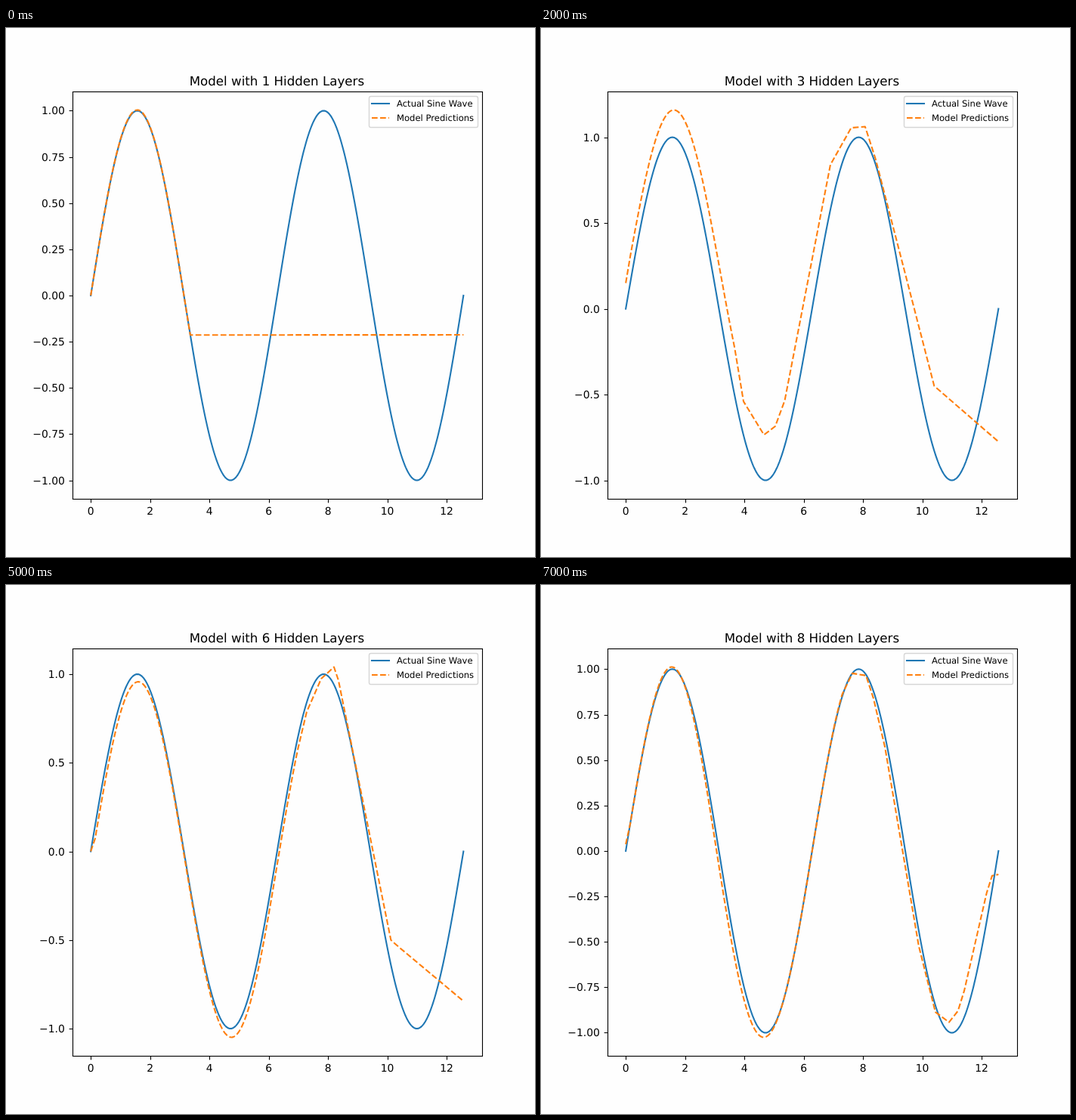
These frames come from a looping animation (700x700 px, 8 s). An HTML page:

```html
<!DOCTYPE html>
<html lang="en">
<head>
<meta charset="utf-8">
<title>Hidden layers</title>
<style>
  html, body { margin: 0; width: 100%; height: 100%; overflow: hidden; background: #fefefe; }
  svg { display: block; width: 700px; height: 700px; }
  text { font-family: "DejaVu Sans", sans-serif; font-size: 13.89px; text-rendering: geometricPrecision; }
  .title { font-size: 16.67px; text-anchor: middle; }
  .key { font-size: 11.6px; }
  .axis { fill: none; stroke: #000; stroke-width: 1.11; }
  .line { fill: none; stroke-width: 2.083; stroke-linejoin: round; }
  .sine { stroke: #1f77b4; stroke-linecap: square; }
  .pred { stroke: #ff7f0e; stroke-dasharray: 7.71 3.33; }
</style>
</head>
<body>
<svg viewBox="0 0 700 700">
  <path id="sine" class="line sine"/>
  <path id="pred" class="line pred"/>
  <rect class="axis" x="88.5" y="84.5" width="542" height="539"/>
  <g id="xAxis"></g>
  <g id="yAxis"></g>
  <text id="title" class="title" x="358.4" y="76"></text>
  <rect x="480.5" y="90.5" width="144" height="41" rx="2.3" fill="#fff" fill-opacity=".8"
        stroke="#ccc" stroke-opacity=".8" stroke-width="1.39"/>
  <path class="line sine" d="M484 100H507"/>
  <path class="line pred" d="M484 119H507"/>
  <text class="key" x="517" y="104">Actual Sine Wave</text>
  <text class="key" x="517" y="123">Model Predictions</text>
</svg>
<script>
const HOLD = 1000, X_MAX = 4 * Math.PI, DX = X_MAX / 400;
const LEFT = 112.16, WIDTH = 493.18, BOTTOM = 598.5, HEIGHT = 490;
const $ = id => document.getElementById(id);

const xPos = x => LEFT + x / X_MAX * WIDTH;
const yPos = (s, v) => BOTTOM - (v - s.lo) / (s.hi - s.lo) * HEIGHT;
const wave = (amp, mid = 0, lag = 0) => x => mid + amp * Math.sin(x - lag);

function sample(fn, from, to) {
  const pts = [];
  for (let x = from; x < to; x += DX) pts.push([x, fn(x)]);
  pts.push([to, fn(to)]);
  return pts;
}
const sine = sample(Math.sin, 0, X_MAX);

// A learned wave up to cut, then straight pieces through the bends to the last value
function scene(head, fit, cut, bends, last) {
  const pred = [[0, head], ...sample(fit, .15, cut), ...bends, [X_MAX, last]];
  const values = pred.map(p => p[1]);
  const lo = Math.min(-1, ...values), hi = Math.max(1, ...values);
  return { pred, lo, hi, step: hi - lo > 2.06 ? .5 : .25 };
}

const early = x => -.0065 + 1.0185 * Math.sin(x + .04 - .04 * Math.cos(x - .5));

const scenes = [
  scene(0, wave(1.004), 3.356, [], -.213),
  scene(.01, wave(1.004), 3.7,
    [[4.03, -.64], [4.66, -.732], [5.1, -.68], [6.85, .66], [7.6, .87], [8.1, .86], [10.1, -.45]], -.7),
  scene(.15, wave(.949, .21, .05), 3.67,
    [[3.97, -.54], [4.66, -.735], [5.04, -.685], [5.36, -.535], [6.9, .84], [7.6, 1.055],
     [8.07, 1.062], [8.42, .875], [10.4, -.45]], -.775),
  scene(.015, wave(1.014, -.002), 6.95,
    [[7.385, .841], [7.59, .899], [8.25, .906], [9.42, -.03], [10.03, -.555], [10.29, -.658]], -.778),
  scene(.01, wave(1.013, -.003), 7.2,
    [[7.6, .95], [7.85, .985], [8.25, .91], [8.75, .62], [9.95, -.45], [10.2, -.55]], -.8),
  scene(0, wave(1.003, -.046, .03), 7,
    [[7.28, .787], [7.77, .974], [8.2, 1.0405], [8.35, .966], [8.66, .71], [10.12, -.5], [10.39, -.54]], -.845),
  scene(.015, wave(1.002, .002), 7.3,
    [[7.49, .93], [7.82, .983], [8.25, .908], [8.53, .773], [8.81, .568], [9.96, -.466], [10.24, -.527]], -.878),
  scene(.037, early, 7.3,
    [[7.64, .977], [8.1, .965], [8.35, .84], [8.74, .57], [9.88, -.524], [10.44, -.886], [10.9, -.942],
     [11.2, -.88], [11.41, -.77], [12.17, -.23], [12.35, -.137]], -.129)
];

const toPath = (s, pts) =>
  "M" + pts.map(([x, v]) => xPos(x).toFixed(2) + " " + yPos(s, v).toFixed(2)).join("L");

const tick = (d, x, y, anchor, label) =>
  `<path class="axis" d="${d}"/><text x="${x}" y="${y}" text-anchor="${anchor}">${label}</text>`;

function xTicks() {
  let out = "";
  for (let v = 0; v <= 12; v += 2) {
    const x = xPos(v);
    out += tick(`M${Math.round(x) + .5} 623.5v4.86`, x.toFixed(2), 644, "middle", v);
  }
  return out;
}

function yTicks(s) {
  let out = "";
  for (let v = -1; v <= 1; v += s.step) {
    const y = yPos(s, v), label = v.toFixed(s.step < .5 ? 2 : 1).replace("-", "\u2212");
    out += tick(`M88.5 ${Math.round(y) + .5}h-4.86`, 77.8, Math.round(y + 5), "end", label);
  }
  return out;
}

let shown = -1;
function draw(t) {
  const n = Math.floor(t / HOLD) % scenes.length;
  if (n === shown) return;
  const s = scenes[n];
  $("title").textContent = `Model with ${n + 1} Hidden Layers`;
  $("sine").setAttribute("d", toPath(s, sine));
  $("pred").setAttribute("d", toPath(s, s.pred));
  $("yAxis").innerHTML = yTicks(s);
  shown = n;
}

$("xAxis").innerHTML = xTicks();
const start = performance.now();
function loop() {
  draw(performance.now() - start);
  requestAnimationFrame(loop);
}
loop();
</script>
</body>
</html>
```
